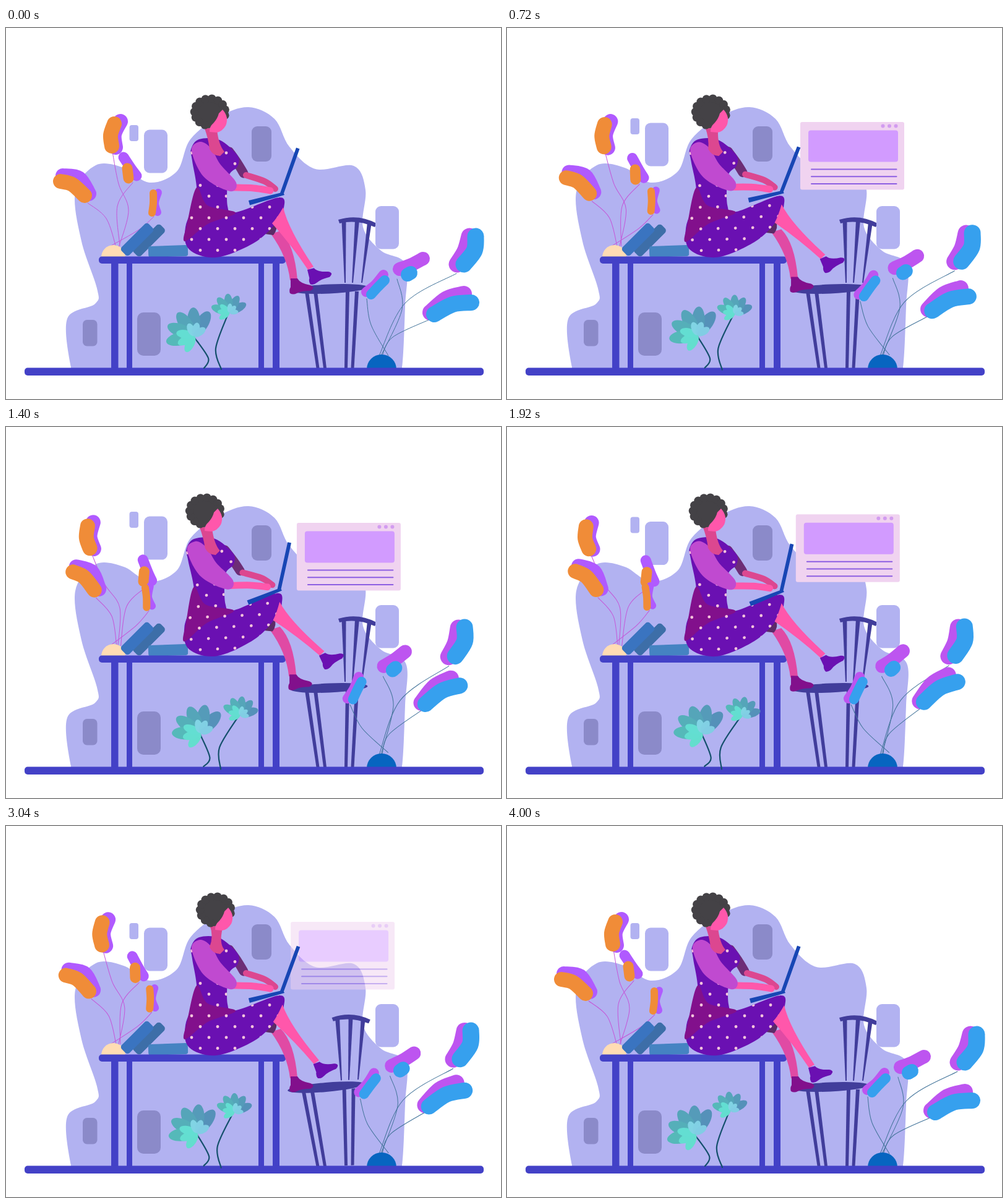
Animation, 800 px wide and 600 px high, one loop 4.04 s. Source, as an HTML page:

```html
<!DOCTYPE html>
<html lang="en">
<head>
<meta charset="utf-8">
<title>Working on the desk</title>
<style>
  html, body { margin: 0; width: 100%; height: 100%; overflow: hidden; background: #fff; }
  svg { display: block; width: 800px; height: 600px; }
</style>
</head>
<body>
<svg id="stage" viewBox="0 0 800 600"></svg>
<script>
const lilac = '#b2b2f1', slate = '#8b8ac9', indigo = '#4341c7', wood = '#413d9b';
const purple = '#6a10b2', plum = '#82108c', pink = '#ff57ab', rose = '#dc4790', dark = '#444246';
const loop = 4040, step = 40;

// Smooth curve through "x,y x,y ..." points
const curve = (text, closed) => {
  const p = text.split(' ').map(q => q.split(',').map(Number)), n = p.length;
  const at = i => closed ? p[(i + n) % n] : p[Math.max(0, Math.min(n - 1, i))];
  let d = 'M' + p[0];
  for (let i = 0; i < (closed ? n : n - 1); i++) {
    const [a, b, c, e] = [at(i - 1), at(i), at(i + 1), at(i + 2)];
    d += 'C' + [0, 1].map(k => b[k] + (c[k] - a[k]) / 6) + ' ' + [0, 1].map(k => c[k] - (e[k] - b[k]) / 6) + ' ' + c;
  }
  return d;
};
const solid = (fill, d) => `<path fill="${fill}" d="${d}"/>`;
const shape = (fill, pts) => solid(fill, curve(pts, true));
const line = (stroke, w, pts) =>
  `<path fill="none" stroke="${stroke}" stroke-width="${w}" stroke-linecap="round" d="${curve(pts)}"/>`;
const box = (fill, x, y, w, h, r, turn = 0) =>
  `<rect fill="${fill}" x="${x}" y="${y}" width="${w}" height="${h}" rx="${r}" transform="rotate(${turn} ${x + w / 2} ${y + h / 2})"/>`;
const dot = (fill, x, y, r) => `<circle fill="${fill}" cx="${x}" cy="${y}" r="${r}"/>`;
const times = (n, make) => Array.from({ length: n }, (_, i) => make(i)).join('');

// Cosine easing from 0 to 1, and there and back
const rise = (t, a, b) => (1 - Math.cos(Math.PI * Math.max(0, Math.min(1, (t - a) / (b - a))))) / 2;
const bump = (t, a, peak, b) => rise(t, a, peak) - rise(t, peak, b);

// Groups whose attributes depend on the time
const motions = [];
const moving = (attrs, ...parts) => {
  const id = 'm' + motions.length;
  motions.push([id, attrs]);
  return `<g id="${id}">${parts.join('')}</g>`;
};
const turning = (pivot, angle, ...parts) =>
  moving(t => ({ transform: `rotate(${angle(t)} ${pivot})` }), ...parts);

const lean = t => -2.6 * bump(t, 0, 1400, 2500);
const nod = t => 10 * bump(t, 2000, 2800, loop) - 8 * bump(t, 720, 1450, 2400);
const chairTilt = t => 2.5 * (rise(t, 3480, 4000) - rise(t, 1880, 2600));
const kick = t => -12.5 * (rise(t, 0, 720) - rise(t, 2600, 3480));
const toes = t => 5 * bump(t, 0, 720, 3000);
const typing = t => 3 * bump(t, 0, 720, loop) - 9 * bump(t, 720, 1680, 2600);

const backdrop = shape(lilac, '105,549 99,470 144,446 147,421 122,345 112,265 145,222 190,226 232,250 276,232 298,180 345,143 392,128 434,147 458,192 500,228 562,223 581,262 577,322 606,360 646,382 645,450 640,549 630,555 115,555');

const panels = moving(t => ({ transform: `translate(0 ${-20 * bump(t, 0, 1350, 2600)})` }),
  box(lilac, 199.5, 157, 14.5, 26, 4), box(lilac, 223, 164.5, 38, 70, 9));

const browser = moving(t => ({
  transform: `translate(${(720 - t) * .006} ${3 * rise(t, 720, 1400) - 14 * bump(t, 1400, 1960, 2600)})`,
  opacity: rise(t, 440, 600) - rise(t, 2960, 3120)
}),
  box('#f0d3f0', 474, 152, 168, 109.5, 3),
  times(3, i => dot('#d29cf0', 607.5 + 10.5 * i, 158.5, 3)),
  box('#d29bff', 487, 165.5, 145, 51, 4),
  times(3, i => line('#8d5fe2', 2, `492,${228.5 + 11.8 * i} 629.5,${228.5 + 11.8 * i}`)));

const spindle = (x, y, foot) => solid(wood, `M${x - 3.5} ${y}h7L${foot + 1} 412h-2Z`);
const chairLeg = (x, foot) => solid(wood, `M${x - 3} 426h6L${foot + 2.5} 550h-5Z`);
const chair = turning('530 549', chairTilt,
  solid(wood, 'M537 310Q569 300 599 316L596 322Q567 309 539 316Z'),
  spindle(546, 312, 548), spindle(567.5, 311, 560), spindle(587.5, 314, 575),
  chairLeg(486, 504), chairLeg(500, 515.5), chairLeg(552, 549.5), chairLeg(567, 560),
  '<ellipse fill="#413d9b" cx="522.5" cy="422" rx="62" ry="7.5" transform="rotate(-2.5 522 422)"/>');

// A swaying stem with a two-tone bean: two thick strokes side by side
const plant = (pivot, stem, back, front) => (turn, peak, width, path, backSpine, frontSpine) =>
  turning(pivot, t => turn * bump(t, 0, peak, loop),
    line(stem, 1, path), line(back, width, backSpine), line(front, width, frontSpine));

const warm = plant('178 360', '#c456d8', '#b05aff', '#f08c38');
const leftPlant = [
  warm(-13.5, 1760, 24, '172,200 182,252 198,295 182,355', '185,151 175,172 177,193', '175,155 169,173 171,191'),
  warm(10.8, 1760, 24, '132,283 162,308 178,355', '92,239 118,243 134,268', '88,248 107,253 127,271'),
  warm(13.4, 1760, 17, '205,250 180,288 184,352', '190,209 202,227 211,239', '196,227 198,243'),
  warm(-8.6, 1760, 12, '239,305 215,326 170,352', '246,266 241,283 245,298', '238,267 238,283 236,299')
].join('') + solid('#ffdcb4', 'M154 371a19.5 20 0 0 1 39 0Z');

const cool = plant('606 530', '#43749a', '#bd55f0', '#36a0ee');
const rightPlant = [
  cool(-5.7, 1760, 27, '728,397 645,445 603,530', '749,337 742,361 729,382', '759,337 757,360 740,382'),
  cool(-13.6, 2000, 26, '688,470 625,500 608,530', '686,460 712,438 740,430', '692,463 722,447 752,444'),
  cool(-12, 1860, 22, '632,406 640,455 606,530', '636,390 655,383 674,373', '649,399 654,396'),
  cool(-18.4, 1600, 16, '583,438 590,480 618,530', '582,427 597,415 610,399', '590,431 601,419 612,408')
].join('') + solid('#0765c0', 'M583 552a24 24 0 0 1 48 0Z');

// Petals fanned over three rings, each ring shifting in hue
const ring = (n, from, to, len, w, hue, hueStep, light) => times(n, i =>
  `<ellipse fill="hsl(${hue + hueStep * i} ${light > 60 ? 65 : 42}% ${light}%)" cx="${len / 2}" rx="${len / 2}" ry="${w}"
    transform="rotate(${from + (to - from) * i / (n - 1)})"/>`);
const flower = (x, y, turn, size) => `<g transform="translate(${x} ${y}) rotate(${turn}) scale(${size})">` +
  ring(5, -58, -192, 46, 10.5, 204, -6, 53) + ring(3, -243, -170, 29, 7, 172, 1, 63) + ring(3, -115, -35, 22, 6, 190, 2, 70) + '</g>';
const bloom = (pivot, path, head) => turning(pivot, t => 13 * bump(t, 0, 1780, loop), line('#14506c', 2.2, path), head);

const shoe = (fill, x, y, turn) =>
  `<g transform="translate(${x} ${y}) rotate(${turn})">${solid(fill, 'M0 0h11q4 8 21 11q9 4 0 9q-15 0 -22 4q-6 3 -11 0q-2 -5 1 -10z')}</g>`;

const dress = curve('299,196 312,180 345,181 374,206 374,224 360,240 358,288 372,298 441,274 449,291 436,316 400,348 340,371 296,358 290,322 308,270 301,215', true);
const spots = times(10, row => times(6, col =>
  dot('#f6c3dc', 300 + 28 * col + 14 * (row % 2), 202 + 17.5 * row, 2.4)));

const woman = turning('330 360', lean,
  line('#6d2d76', 15, '361,200 375,220 384,235'),
  line(rose, 10, '388,238 418,248 435,260'),
  turning('440 330', t => -1.1 * lean(t),
    solid('#e04aa4', 'M428 333L444 328Q466 350 471 407L459 408Q455 370 428 333Z'),
    shoe(plum, 460, 405, 0)),
  solid('#5c2a68', 'M405 331L436 314Q440 326 432 335Z'),
  `<clipPath id="dress"><path d="${dress}"/></clipPath>`,
  solid(purple, dress),
  shape(plum, '308,258 326,287 371,299 326,317 289,345 293,315'),
  `<g clip-path="url(#dress)">${spots}</g>`,
  turning('437 300', kick,
    solid(pink, 'M448 290Q456 325 497 386L488 391Q462 352 430 316Q439 306 448 290Z'),
    turning('491 389', toes, shoe(purple, 487, 391, -14))),
  turning('447 268', typing,
    solid('#1746b4', 'M392 279L448 265.5L450 270L394 286.5ZM443 267L469 193.5L474.5 195.5L448 270Z')),
  line(pink, 11, '366,258 400,259 427,263'),
  shape('#c04ad0', '300,198 314,184 332,195 346,220 372,250 362,264 320,241'));

// The neck joins the leaning torso to the nodding head
const neck = t => {
  const top = nod(t), base = lean(t) * 2.8;
  return `M${320 + top} 160Q${327 + top} 178 ${329 + base} 196Q${335 + base} 207 ${346 + base} 207
    L${353 + base} 200Q${344 + base} 190 ${341 + top} 165Z`;
};
const head = moving(t => ({ transform: `translate(${nod(t)} 0)` }),
  `<ellipse fill="${dark}" cx="327" cy="137" rx="26" ry="25"/>`,
  times(12, i => {
    const a = 1.9 + .42 * i;
    return dot(dark, 329.5 + 25 * Math.cos(a), 136 + 22 * Math.sin(a), 6.8);
  }),
  solid(pink, 'M350 132Q361 144 355 158Q349 168 340 169L329 168Q328 160 336 153Q342 146 344 138Z'));

const deskLeg = (x, w) => box(indigo, x, 374, w, 178, 1);

document.getElementById('stage').innerHTML = [
  backdrop,
  box(slate, 397, 159, 32, 57, 9), box(slate, 124, 472, 23.5, 42.5, 7), box(slate, 212, 460, 38, 70, 10),
  panels, browser, chair, box(lilac, 597, 288, 38, 69.5, 9),
  leftPlant,
  box('#3d6ea8', 200, 335, 62, 17, 5, -45), box('#3a74c0', 181, 333, 62, 18, 5, -45), box('#4583c2', 230, 352, 64, 18, 4, -2),
  deskLeg(170, 11.5), deskLeg(195, 9), deskLeg(408, 9), deskLeg(431, 11),
  box(indigo, 150, 369.5, 302, 11.5, 5),
  woman, moving(t => ({}), solid(rose, '')).replace('<path', '<path id="neck"'), head,
  rightPlant,
  box(indigo, 30, 549.5, 742, 12.5, 5),
  bloom('325 546', '304,500 327,534 320,550', flower(304, 498, 0, 1)),
  bloom('341 548', '359,462 339,518 348,552', flower(361, 460, 30, .66))
].join('');

const el = id => document.getElementById(id);
const draw = t => {
  for (const [id, attrs] of motions)
    for (const [name, value] of Object.entries(attrs(t))) el(id).setAttribute(name, value);
  el('neck').setAttribute('d', neck(t));
};
const tick = now => {
  draw(Math.floor(now / step) * step % loop);
  requestAnimationFrame(tick);
};
draw(0);
requestAnimationFrame(tick);
</script>
</body>
</html>
```
